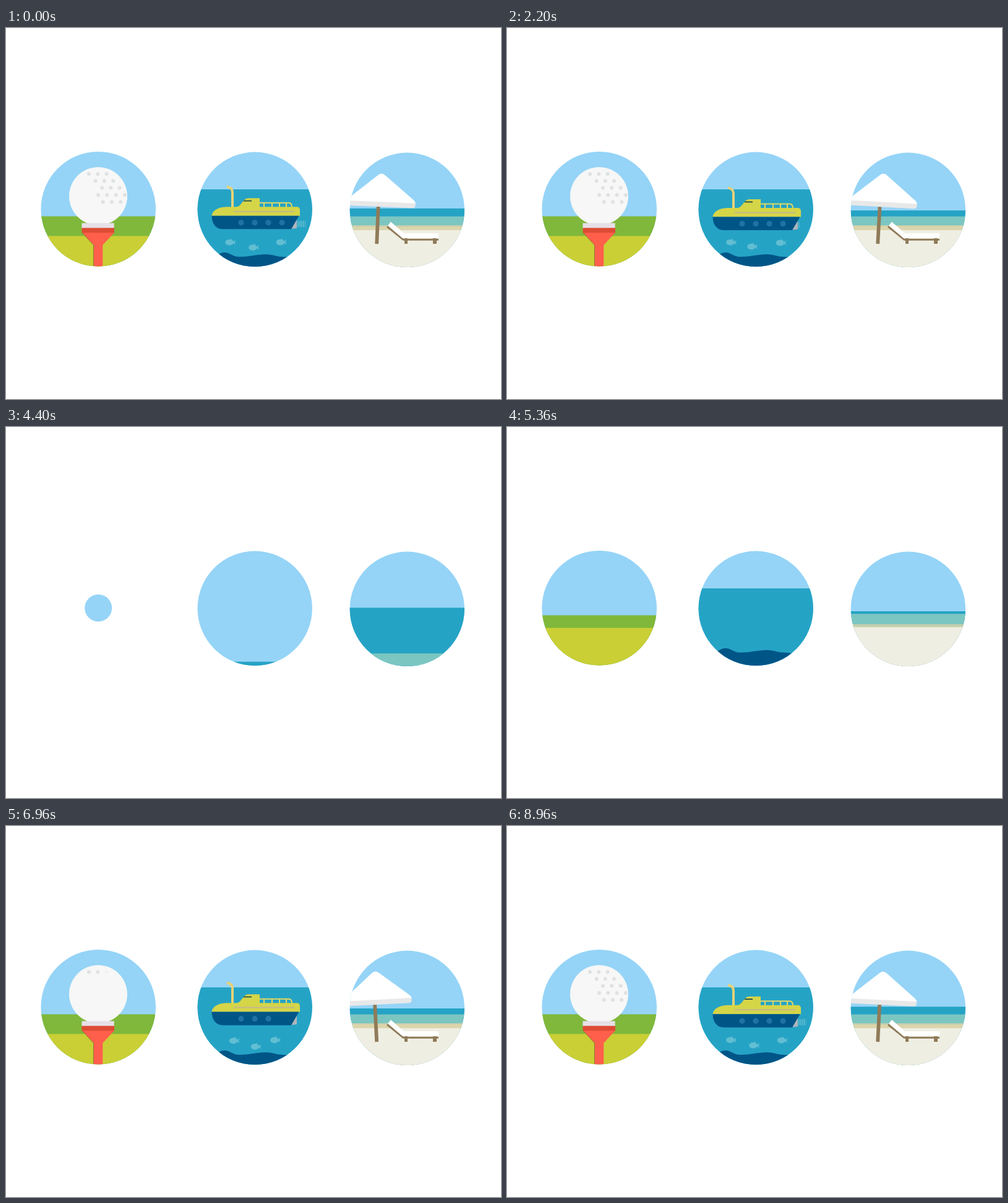
An HTML page that plays this animation: 800 by 600 pixels, repeating every 9000 ms.

```html
<!DOCTYPE html>
<html lang="en">
<head>
<meta charset="utf-8">
<title>Holiday badges</title>
<style>
  html, body { margin: 0; width: 100%; height: 100%; overflow: hidden; background: #fff; }
  svg { display: block; width: 800px; height: 600px; }
</style>
</head>
<body>
<svg viewBox="0 0 800 600">
  <defs>
    <clipPath id="golfClip"><circle id="golfDisc" cx="149.2" cy="292.8"/></clipPath>
    <clipPath id="boatClip"><circle id="boatDisc" cx="402.2" cy="293.3"/></clipPath>
    <clipPath id="beachClip"><circle id="beachDisc" cx="648.3" cy="294.3"/></clipPath>
    <g id="fishShape" fill="#62bed2">
      <ellipse cx="-1.5" rx="6.8" ry="4.8"/>
      <path d="M3 0 L8.5 -4 L7 0 L8.5 4 Z M-2 -4 L2 -6 L2 -3 Z"/>
    </g>
  </defs>

  <g clip-path="url(#golfClip)">
    <rect x="50" y="195" width="200" height="200" fill="#95d4f7"/>
    <rect id="grass" x="50" width="200" height="120" fill="#7fb83b"/>
    <rect id="field" x="50" width="200" height="120" fill="#c9cf35"/>
    <g id="tee">
      <path d="M123 331 H175 L156.3 351 V390 H141.5 V351 Z" fill="#ff5f4b"/>
      <path d="M123 331 L141.5 351 V390" fill="none" stroke="#8a7a30"/>
    </g>
    <g id="ball">
      <circle cx="149" cy="272" r="47" fill="#f6f7f6"/>
      <g id="dimples" fill="#dfe2e2"></g>
    </g>
    <g id="cup">
      <rect x="122.5" y="315.5" width="52.2" height="8.5" fill="#e7e0e8"/>
      <rect x="122.5" y="323.3" width="52.5" height="7.8" fill="#dd4b34"/>
    </g>
  </g>

  <g clip-path="url(#boatClip)">
    <rect x="300" y="195" width="200" height="200" fill="#95d4f7"/>
    <rect id="water" x="300" width="200" height="140" fill="#25a3c5"/>
    <path id="seabed" fill="#005587"
      d="M335 370 C343 367 346 363 353 363 C362 363 366 370 377 370 C394 370 405 366 420 366 C432 366 436 370 448 370 L475 372 V410 H335 Z"/>
    <g id="boat">
      <g id="wake" fill="#5ebbcf"></g>
      <path d="M461 325 L470 308 V324 Z" fill="#b0b5bb"/>
      <path d="M366 291 V266 Q366 258 357 257" fill="none" stroke="#e6d277" stroke-width="4"/>
      <path d="M410 283 H457 Q462 283 462 290 M417 283 V290 M430 283 V290 M442 283 V290 M453 283 V290"
        fill="none" stroke="#e0d964" stroke-width="2"/>
      <path d="M332.5 304 C333 296 342 290 356 289.5 H373 C380 289 383 276 391 275.5 H410 V289.5 H470 Q475 289.5 475 295 V304 Z" fill="#d5d548"/>
      <rect x="384" y="278.7" width="13" height="2" fill="#355a48"/>
      <path d="M368 296.8 H466" stroke="#c2b88c" stroke-width="2"/>
      <path d="M332.5 303.8 H473.5 L461 325.5 H350 C338 325 332.5 315 332.5 303.8 Z" fill="#005587"/>
      <g id="portholes" fill="#1f72a3"></g>
    </g>
    <use id="fish0" href="#fishShape"/>
    <use id="fish1" href="#fishShape"/>
    <use id="fish2" href="#fishShape"/>
  </g>

  <g clip-path="url(#beachClip)">
    <rect x="550" y="195" width="200" height="200" fill="#95d4f7"/>
    <rect id="sea" x="550" width="200" height="120" fill="#25a3c5"/>
    <rect id="shallows" x="550" width="200" height="120" fill="#7cc6c1"/>
    <rect id="wetSand" x="550" width="200" height="120" fill="#dcd5ac"/>
    <rect id="foam" x="550" width="200" fill="#c5cfae"/>
    <rect id="sand" x="550" width="200" height="120" fill="#efeee3"/>
    <g id="lounger">
      <path d="M616 321 L642 342.2 H699" fill="none" stroke="#8f7b59" stroke-width="3"/>
      <path d="M644 339 h5 v10 h-5 Z M690 339 h6 v10 h-6 Z" fill="#8f7b59"/>
      <path d="M617 319.5 L622 313.5 L643 332 H699 V340 H641 Z" fill="#fff"/>
    </g>
    <g id="parasol">
      <rect x="596.3" y="286" width="5.8" height="63" fill="#8f7b59"/>
      <path d="M546 280 H659 V284 Q659 289 654 289 H551 Q546 289 546 284 Z" fill="#e8e8e8"/>
      <path d="M546 281 L597 237.5 Q602.5 233 608 237.5 L656 276 Q659 279 659 281 Z" fill="#fff"/>
    </g>
  </g>
</svg>
<script>
const LOOP = 9000, RESTART = 3760, STEP = 40, BEAT = 1200;
const SVG_NS = "http://www.w3.org/2000/svg";
const el = id => document.getElementById(id);
const set = (id, name, value) => el(id).setAttribute(name, value);
const move = (id, x, y) => set(id, "transform", `translate(${x} ${y})`);

const clamp = v => Math.min(1, Math.max(0, v));
const mix = (a, b, k) => a + (b - a) * k;
const span = (t, start, length) => clamp((t - start) / length);
const smooth = k => k * k * (3 - 2 * k);
// Ease-out; a larger pull gives a larger overshoot, zero gives none.
const settle = (k, pull = 0) => 1 + (pull + 1) * (k - 1) ** 3 + pull * (k - 1) ** 2;
const glide = (t, start, length, from, to, pull) =>
  mix(from, to, settle(span(t, start, length), pull));
const sway = (t, peak, period = BEAT) => Math.cos(2 * Math.PI * (t - peak) / period);

function add(parent, tag, attrs) {
  const node = document.createElementNS(SVG_NS, tag);
  for (const name in attrs) node.setAttribute(name, attrs[name]);
  el(parent).append(node);
  return node;
}

const dimpleRows = [[134, 3], [144.6, 3], [155, 3], [149, 4], [156.7, 3]];
const dimples = dimpleRows.flatMap(([x, count], row) =>
  Array.from({ length: count }, (_, i) =>
    add("dimples", "circle", { cx: x + 14.3 * i, cy: 236 + 11.3 * row, r: 3 })));
const portholes = [0, 1, 2, 3].map(i =>
  add("portholes", "circle", { cx: 380 + 22 * i, cy: 315, r: 4.6 }));
const wake = [0, 1, 2, 3, 4].map(i =>
  add("wake", "rect", { x: 471 + 3 * i, y: 312, width: 1.8, height: 10 }));

function scaleAt(id, x, y, size, angle = 0) {
  set(id, "transform", `translate(${x} ${y}) rotate(${angle}) scale(${size}) translate(${-x} ${-y})`);
}

function drawGolf(t) {
  set("golfDisc", "r", glide(t, 4357, 500, 0, 92.8));
  set("grass", "y", glide(t, 4680, 450, 387, 304.5));
  set("field", "y", glide(t, 5060, 600, 387, 336.3, 2.8));
  const teeY = glide(t, 5500, 450, 75, 0, 1);
  move("tee", 0, teeY);
  move("cup", 0, teeY);
  scaleAt("ball", 149, 319, glide(t, 6200, 700, 0, 1, 1.7));
  dimples.forEach((dot, i) => dot.setAttribute("opacity", span(t, 6780 + 80 * i, 80)));
}

function drawBoat(t) {
  set("boatDisc", "r", glide(t, 3920, 460, 0, 92.7));
  set("water", "y", glide(t, 4388, 600, 387, 261, 0));
  move("seabed", 0, glide(t, 5080, 560, 26, 0, 2.6));
  move("boat", glide(t, 5700, 700, 175, 0, 0.5), 2.5 * sway(t, 350) - 0.8);
  portholes.forEach((hole, i) => {
    hole.setAttribute("opacity", span(t, 6600 + 120 * i, 120));
  });
  const reach = t > 7200 ? -15 * sway(t, 70) : 0;
  wake.forEach((line, i) => line.setAttribute("opacity", clamp(reach / 3 - i)));

  const enter = i => glide(t, 6050 + 80 * i, 650, 150, 0);
  move("fish0", enter(0) + 366 + 4 * sway(t, 1090), 347.5 + 1.6 * sway(t, 200, 600));
  move("fish1", enter(1) + 400 + 4.3 * sway(t, 880), 354 + 3 * sway(t, 2260, 2 * BEAT));
  move("fish2", enter(2) + 438.5 + 6.5 * sway(t, 560), 347 + sway(t, 200));
}

function drawBeach(t) {
  const tide = sway(t, 80);
  const calm = mix(292.3, 298, smooth(span(t, 4400, 960)));
  const level = mix(calm, 295.5 + 4 * tide, smooth(span(t, 5400, 600)));
  set("beachDisc", "r", glide(t, RESTART, 400, 0, 92.7));
  set("sea", "y", mix(388, level, settle(span(t, 4020, 360))));
  set("shallows", "y", glide(t, 4300, 1400, 388, 304.7, 1));
  set("wetSand", "y", glide(t, 4660, 600, 388, 319.2));
  set("foam", "y", 319.2);
  set("foam", "height", t > 5240 ? mix(5, 1.2 - 1.2 * tide, smooth(span(t, 5400, 600))) : 0);
  set("sand", "y", glide(t, 4900, 700, 390, 327, 1.2));
  scaleAt("parasol", 599, 349, glide(t, 5700, 650, 0, 1, 1.2), 3.3 * sway(t, 455));
  move("lounger", glide(t, 5900, 600, 130, 0), 0);
}

function draw(now) {
  const phase = Math.floor(now % LOOP / STEP) * STEP;
  // The scene is built anew at RESTART and carries on through the loop seam.
  const t = phase < RESTART ? phase + LOOP : phase;
  drawGolf(t);
  drawBoat(t);
  drawBeach(t);
}

const begin = performance.now();
function tick() {
  draw(performance.now() - begin);
  requestAnimationFrame(tick);
}
tick();
</script>
</body>
</html>
```
